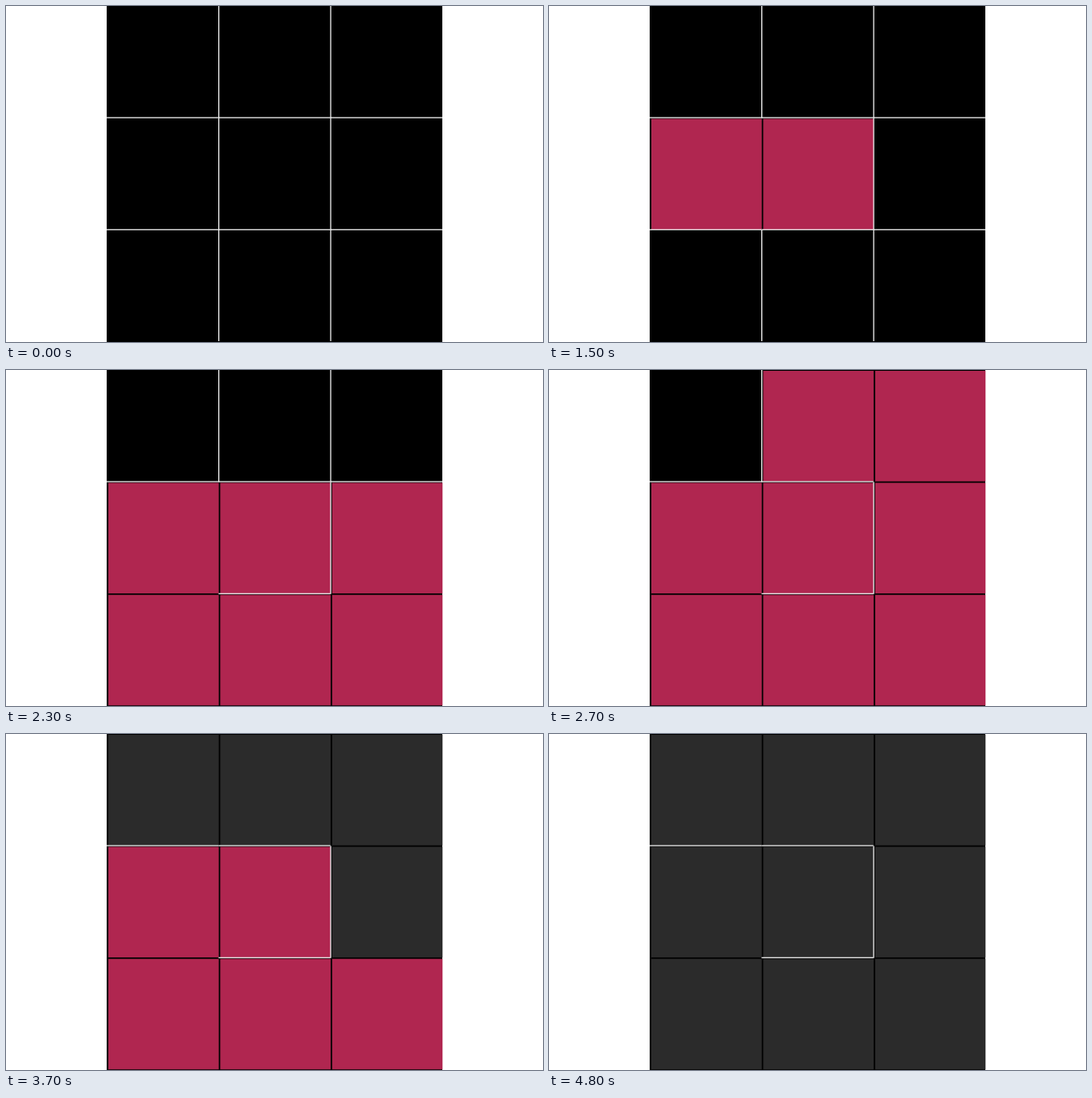
An HTML page with a canvas for the animation above (5.3 s loop, 640 by 400 pixels).

```html
<!DOCTYPE html>
<html lang="en">
<head>
<meta charset="utf-8">
<title>Spiral maze</title>
<style>
html, body { margin: 0; width: 100%; height: 100%; overflow: hidden; background: #fff; }
canvas { display: block; }
</style>
</head>
<body>
<canvas id="c" width="640" height="400"></canvas>
<script>
const g = document.getElementById('c').getContext('2d');
const LOOP = 5300, SIZE = 400 / 3, LEFT = 120;

// Place of each cell along the walk through the maze
const order = [[8, 7, 6], [1, 0, 5], [2, 3, 4]];

// Times in tenths of a second, by place in the walk
const enter = [11, 13, 16, 18, 20, 22, 25, 27, 29];
const leave = [47, 44, 42, 40, 38, 36, 34, 31, 29];

function rect(color, x, y, w, h) {
  g.fillStyle = color;
  g.fillRect(x, y, w, h);
}

// A wall falls when the walk steps through it
function stands(a, b, t) {
  return Math.abs(a - b) > 1 || t < enter[Math.max(a, b)];
}

function draw(t) {
  rect('#fff', 0, 0, 640, 400);
  rect('#000', LEFT, 0, 400, 400);

  order.forEach((row, r) => row.forEach((k, c) => {
    if (t < enter[k]) return;
    const color = t < leave[k] ? '#b02650' : '#2b2b2b';
    rect(color, LEFT + c * SIZE + 2, r * SIZE + 1, 131.6, 131.6);
  }));

  order.forEach((row, r) => row.forEach((k, c) => {
    const x = LEFT + c * SIZE, y = r * SIZE;
    if (c < 2 && stands(k, row[c + 1], t))
      rect('#fff', x + SIZE - 0.3, y, 1.2, Math.min(SIZE, 399 - y));
    if (r < 2 && stands(k, order[r + 1][c], t))
      rect('#fff', x, y + SIZE - 1, SIZE, 1.2);
  }));
}

const start = performance.now();
function tick() {
  draw((performance.now() - start) % LOOP / 100);
  requestAnimationFrame(tick);
}
tick();
</script>
</body>
</html>
```
